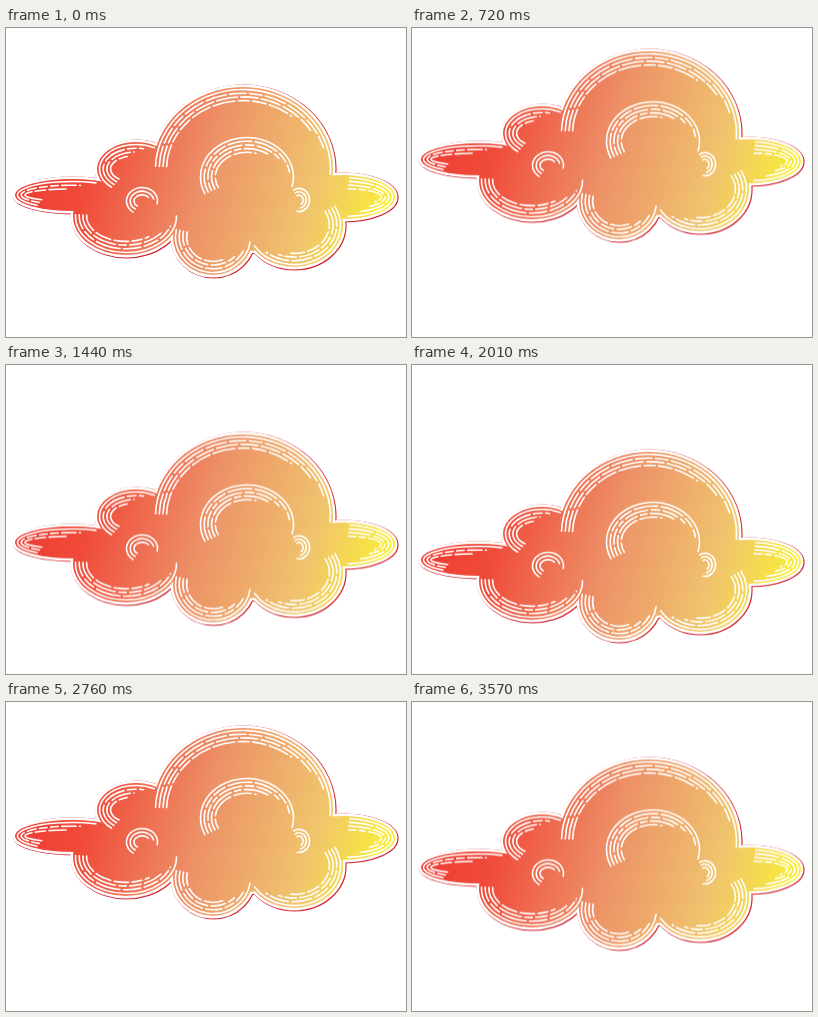
Recreate the animation shown at these times as an HTML page. Size 400x309 px, loop 3600 ms.

```html
<!DOCTYPE html>
<html lang="en">
<head>
<meta charset="utf-8">
<title>Floating cloud</title>
<style>
html, body { margin: 0; width: 100%; height: 100%; overflow: hidden; background: #fff; }
svg { display: block; width: 400px; height: 309px; }
#cloud { animation: drift 3600ms linear infinite; }
@keyframes drift {
  0%, 100% { transform: translateY(0); }
  19.7% { transform: translateY(-36.5px); }
  52.2% { transform: translateY(38.5px); }
  79.4% { transform: translateY(-41px); }
}
#lines { fill: none; stroke: #fff; stroke-width: 1.6; stroke-linecap: round; }
</style>
</head>
<body>
<svg viewBox="0 0 400 309">
  <defs>
    <linearGradient id="sunset" gradientUnits="userSpaceOnUse" x1="20" y1="100" x2="375" y2="196">
      <stop offset="0" stop-color="#ef3b33"/>
      <stop offset=".2" stop-color="#f04b3a"/>
      <stop offset=".5" stop-color="#ed9067"/>
      <stop offset=".8" stop-color="#f0c46e"/>
      <stop offset="1" stop-color="#f9ec38"/>
    </linearGradient>
    <g id="shape"></g>
  </defs>
  <g id="cloud">
    <use href="#shape" transform="translate(.7 .5)" fill="#d0202a" stroke="#d0202a" stroke-width="5.8"/>
    <use href="#shape" fill="#fff" stroke="#fff" stroke-width="5"/>
    <use href="#shape" fill="url(#sunset)"/>
    <g id="lines"></g>
  </g>
</svg>
<script>
// Ellipses with the arc (degrees, clockwise from the right) that carries the hatching.
const puffs = [
  { cx: 237, cy: 141, rx: 90, ry: 82, from: 182, to: 364 },
  { cx: 130, cy: 141, rx: 39, ry: 27, from: 132, to: 300 },
  { cx: 120, cy: 188, rx: 53, ry: 39, from: 182, to: 0 },
  { cx: 207, cy: 209, rx: 40, ry: 38, from: 192, to: 8 },
  { cx: 288, cy: 197, rx: 49, ry: 42, from: -28, to: 148 },
  { cx: 66, cy: 167, rx: 57, ry: 16, from: 130, to: 296, rings: 3 },
  { cx: 337, cy: 169, rx: 52, ry: 22, from: -82, to: 84 }
];
const curls = [
  { cx: 241, cy: 149, rx: 49, ry: 42, from: 155, to: 374, rings: 5 },
  { cx: 293, cy: 172, rx: 13, ry: 14, from: 240, to: 460, rings: 3 },
  { cx: 136, cy: 173, rx: 18, ry: 16, from: 125, to: 372, rings: 3 }
];

let seed = 7;
const random = () => (seed = seed * 16807 % 2147483647) / 2147483647;

function add(parent, tag, attrs) {
  const el = document.createElementNS('http://www.w3.org/2000/svg', tag);
  for (const key in attrs) el.setAttribute(key, attrs[key]);
  document.getElementById(parent).append(el);
}

// Nested arcs share a start; each inner one stops a tenth of the span earlier.
function hatch({ cx, cy, rx, ry, from, to, rings = 4 }) {
  const gap = Math.min(3.7, rx / 4, ry / 4);
  for (let i = 0; i < rings; i++) {
    const x = rx - 2.5 - gap * i, y = ry - 2.5 - gap * i;
    const span = (to - from) * (1 - i / 10);
    const at = deg => {
      const a = deg * Math.PI / 180;
      return `${cx + x * Math.cos(a)} ${cy + y * Math.sin(a)}`;
    };
    const large = Math.abs(span) > 180 ? 1 : 0, sweep = span > 0 ? 1 : 0;
    const dashes = Array.from({ length: 4 }, () => `${6 + 20 * random()} 3.5`);
    add('lines', 'path', {
      d: `M${at(from)}A${x} ${y} 0 ${large} ${sweep} ${at(from + span)}`,
      'stroke-dasharray': i && rx > 20 ? dashes.join(' ') : 'none'
    });
  }
}

for (const { cx, cy, rx, ry } of puffs) add('shape', 'ellipse', { cx, cy, rx, ry });
[...puffs, ...curls].forEach(hatch);
</script>
</body>
</html>
```
